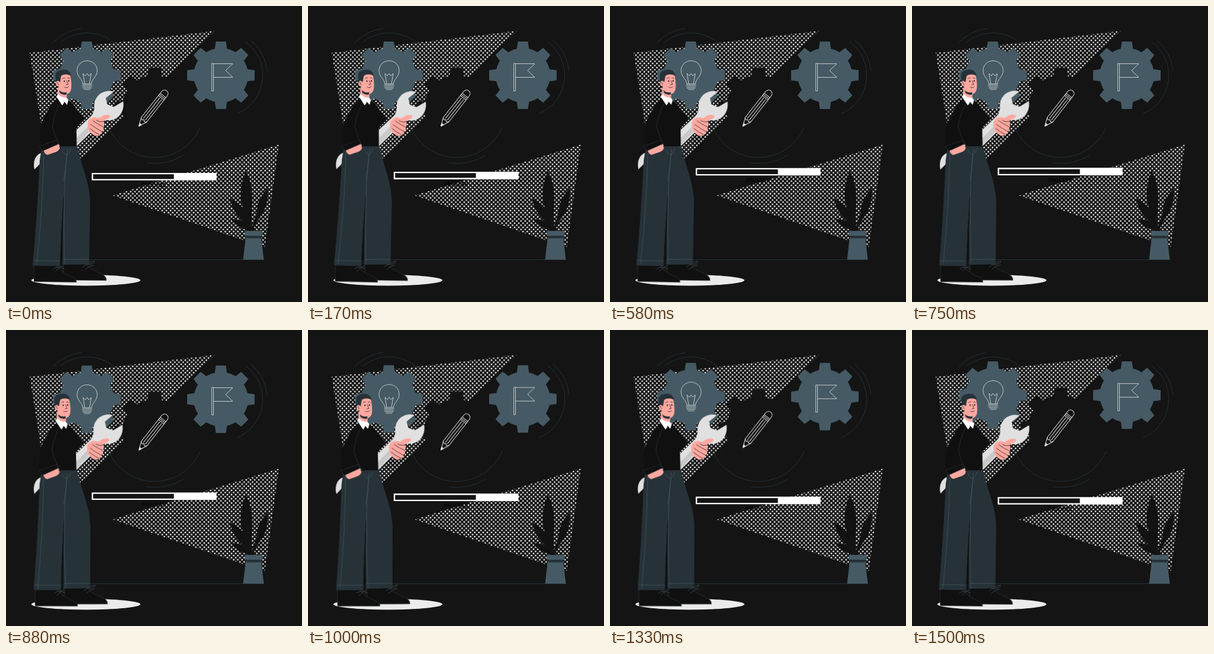
Write an HTML page that moves like this. It is 500 px wide and 500 px high and loops after 1540 ms.

```html
<!DOCTYPE html>
<html lang="en">
<head>
<meta charset="utf-8">
<title>Work in progress</title>
<style>
  html, body { margin: 0; width: 100%; height: 100%; overflow: hidden; background: #141414; }
  svg { display: block; width: 100vw; height: 100vh; }
  .lift { animation: lift 1540ms infinite; }
  .bob { animation: bob 770ms cubic-bezier(.37, 0, .63, 1) -80ms infinite alternate; }
  .sway { transform-origin: 110px 285px; animation: sway 770ms cubic-bezier(.37, 0, .63, 1) -445ms infinite alternate; }
  @keyframes lift {
    0%, 55.8% { transform: translateY(0); animation-timing-function: cubic-bezier(.36, 0, .64, .577); }
    100% { transform: translateY(-7.5px); }
  }
  @keyframes bob {
    from { transform: translateY(4.5px); }
    to { transform: translateY(-4.5px); }
  }
  @keyframes sway {
    from { transform: rotate(-.89deg); }
    to { transform: rotate(.55deg); }
  }
  .line { fill: none; stroke: #e6e6e6; stroke-linejoin: round; stroke-linecap: round; }
  .seam { fill: none; stroke: #455a64; stroke-width: .7; stroke-linecap: round; }
  .ink { fill: none; stroke: #1c1c1c; stroke-width: .8; stroke-linecap: round; }
  .skin { fill: #ffa8a0; }
  .steel { fill: #e0e0e0; }
  .cloth { fill: #101010; }
  .label { font: 600 8.5px Inter, Roboto, sans-serif; fill: #060606; text-anchor: middle; }
</style>
</head>
<body>
<svg viewBox="0 0 500 500">
  <defs>
    <pattern id="dots" x="42" y="81" width="7.1" height="7.1" patternUnits="userSpaceOnUse">
      <g fill="#fff">
        <circle cx="1.775" cy="1.775" r="1.35"/>
        <circle cx="5.325" cy="5.325" r="1.35"/>
      </g>
    </pattern>
    <path id="tooth" d="M-10.5-43L-8.5-57H8.5L10.5-43Z"/>
    <g id="pair"><use href="#tooth"/><use href="#tooth" transform="rotate(180)"/></g>
    <g id="gear">
      <circle r="46"/>
      <use href="#pair"/>
      <use href="#pair" transform="rotate(45)"/>
      <use href="#pair" transform="rotate(90)"/>
      <use href="#pair" transform="rotate(135)"/>
    </g>
  </defs>

  <rect width="500" height="500" fill="#141414"/>
  <g fill="url(#dots)">
    <path d="M40 79L353 42L76 305Z"/>
    <path d="M461 234L180 320L437 408Z"/>
  </g>

  <g fill="none" stroke="#263238" stroke-width=".9">
    <path d="M92 61A72 72 0 0 1 183 62M79 62A80 80 0 0 1 127 38"/>
    <path d="M404 60A70 70 0 0 1 390 182M414 58A78 78 0 0 1 441 110"/>
    <path d="M174 206A84 84 0 0 0 328 205M238 265A94 94 0 0 0 300 252"/>
    <path d="M50 428.5H436"/>
  </g>

  <!-- plant -->
  <g fill="#121212" stroke="#1a1a1a" stroke-width=".5">
    <path d="M414 380Q410 362 402 347Q390 316 405 279Q419 303 415 345Q413 362 417 380Z"/>
    <path d="M415 380Q416 366 423 354Q423 328 442 308Q444 338 428 358Q420 368 418 380Z"/>
    <path d="M413 380Q405 370 398 360Q383 348 379 326Q398 334 408 352Q414 366 416 380Z"/>
    <path d="M413 380Q402 377 395 373Q385 368 380 360Q396 360 406 368Q414 373 416 380Z"/>
    <path d="M405 284Q405 340 415 378M441 310Q428 338 417 378M381 328Q398 350 414 378" fill="none"/>
  </g>
  <path d="M405 390H431L435.500 428.500H400.500Z" fill="#455a64"/>
  <path d="M404.500 387H432.500L431.500 392.500H405.500Z" fill="#263238"/>
  <path d="M403.500 380H433.500V388H403.500Z" fill="#455a64"/>

  <g class="lift">
    <use href="#gear" x="136.500" y="117" fill="#455a64"/>
    <use href="#gear" x="363" y="117" fill="#455a64"/>
    <use href="#gear" transform="translate(251 172) scale(1.19)" fill="#141414"/>

    <g class="line" stroke-width=".8">
      <path d="M129.500 131C129.500 123 120 120 120 109A17 16.500 0 0 1 154 109C154 120 144.500 123 144.500 131Z"/>
      <path d="M133 131L130 114L134 118L137 114L140 118L144 114L141 131"/>
      <path d="M129 133.500H145M129 136H145M130 138.500H144M132 141H142"/>
      <path d="M348 97H350.500V143.500H348ZM350.500 97.500H383L371 109L383 120.500H350.500"/>
    </g>
    <g class="line" stroke-width="1" transform="translate(224.500 203) rotate(38.200)">
      <path d="M0 0L-6-14V-69Q-6-76 0-76T6-69V-14Z" fill="#101010"/>
      <path d="M-6-14L-2.500-11.500L0-14L2.500-11.500L6-14M-2-15V-59M2.200-15V-59M-6-61H6M-6-63.500H6M-6-66H6"/>
      <path d="M0 0L-2-4.500H2Z" fill="#e6e6e6"/>
    </g>
  </g>

  <g class="bob">
    <path d="M144.800 277.700H355.600V290.300H144.800Z" fill="#fff"/>
    <path d="M147.200 280H283.600V288H147.200Z" fill="#141414"/>
    <text class="label" x="250" y="301.500">PROCESS</text>
  </g>

  <ellipse cx="135" cy="463.300" rx="92" ry="9.200" fill="#ebebeb"/>

  <g class="sway">
    <!-- wrench -->
    <g class="steel">
      <path d="M60 248C50 251 45 262 48 276L57 267L66 262Z"/>
      <path d="M114 214L151 179L166 191L114 242Z"/>
      <path d="M182 144.500L168.500 155.500L171 166L182 170.500L198 161C201 180 188 194 172 193Q164 192 158 198L144 186Q150 179 149 168C150 150 166 140 182 144.500Z"/>
    </g>
    <path d="M118 224L146 196L152 201L118 236Z" fill="#c9c9c9"/>

    <!-- shoes -->
    <g class="cloth" stroke="#2b343a" stroke-width=".7">
      <path d="M97 434L134 434Q140 444 160 452Q170 456 169.500 463.500L116 463L97 452Z"/>
      <path d="M48 437L84 437Q90 448 108 456Q119 459 119 466.500L47.500 465.500Q46 452 48 437Z"/>
    </g>
    <path class="seam" d="M80 444Q88 438 98 444M84 448Q92 440 96 439M130 441Q140 432 149 431Q150 436 136 437M134 445Q143 437 148 438"/>

    <!-- trousers -->
    <path d="M61 236H119.500L128 266C136 292 142 310 142 334L140.500 436.500L95.500 437Q94 380 98 322H97Q93 380 91 439.500L45 438.500Q53 350 57 260Z" fill="#263238"/>
    <path d="M97.500 322Q93 380 91.500 430L95.500 429Q95.500 370 97.500 322Z" fill="#101010"/>
    <path class="seam" d="M64 248Q62 340 52 436M47 430L91 431M97 428L140 428M104 241Q99 290 98.500 322Q97 380 99 436M95 243Q97 250 103 251Q108 247 110 240M103 251Q101 275 97.500 295"/>

    <!-- sweater and pocket hand -->
    <path class="cloth" d="M87 157Q76 166 70 178Q59 196 57 210Q56 226 58 240L88 229L91 237H119.500L119 206L133 191Q122 180 117 171Q111 162 104 158Z"/>
    <path d="M90 166Q80 188 78.500 204Q82 219 90 234" fill="none" stroke="#30383c" stroke-width=".7"/>
    <path class="skin" d="M63 243Q75 239 88 232L91 240Q89 246 80 248L70 251.500Q65 250 63 243Z"/>
    <path class="cloth" d="M56.500 237L86 226.500L89 233L62 245Z" stroke="#30383c" stroke-width=".6"/>

    <!-- head -->
    <path class="skin" d="M87 138L87.500 154Q92 162 101 163L103 150Z"/>
    <path d="M85 153L88 148.500Q94 156 102 154.500L105.500 159L103 167L99 162L95 168Z" fill="#fff"/>
    <path d="M98 162L100 166" class="ink"/>
    <path class="skin" d="M90 117Q100 111 108.500 117Q110.500 126 110.500 134Q110.500 143 107 146.500Q102 151 96 148L88 141Z"/>
    <path d="M83.500 122Q82.500 114 86 111Q91 107 99 107.500Q108 108 110 118Q101 113.500 93.500 117.500Q92 122 91.500 128L88.500 129L88.500 138Q84 132 83.500 122Z" fill="#263238"/>
    <path d="M89.500 142Q95 147.500 102.500 145.500L102 149.500Q96 151 91 147Z" fill="#263238"/>
    <ellipse class="skin" cx="87.500" cy="131" rx="3.300" ry="4.600"/>
    <path class="ink" d="M86 129Q88 129 88.500 133M95.500 122.500Q97.500 120.500 99.500 121.500M104 121.500Q106 120.500 107.500 122.500M102.500 126L105 132.500L101.500 133M99 137Q102 139.500 105.500 136.500"/>
    <ellipse cx="98.500" cy="127" rx="1" ry="1.500" fill="#1c1c1c"/>
    <ellipse cx="106" cy="126.500" rx="1" ry="1.500" fill="#1c1c1c"/>

    <!-- gripping hand -->
    <path class="skin" d="M138 196Q143 186 152 188Q157 191 162 186Q167 183 174 184Q178 186 173 190Q168 191 165 195Q168 200 164 204Q167 209 162 212Q163 217 157 217Q155 222 148 218Q139 213 138 204Z"/>
    <path class="ink" d="M147 194Q155 200 164 204M143 200Q152 207 162 212M142 207Q149 213 157 217M165 195Q158 197 153 193"/>
  </g>
</svg>
</body>
</html>
```
